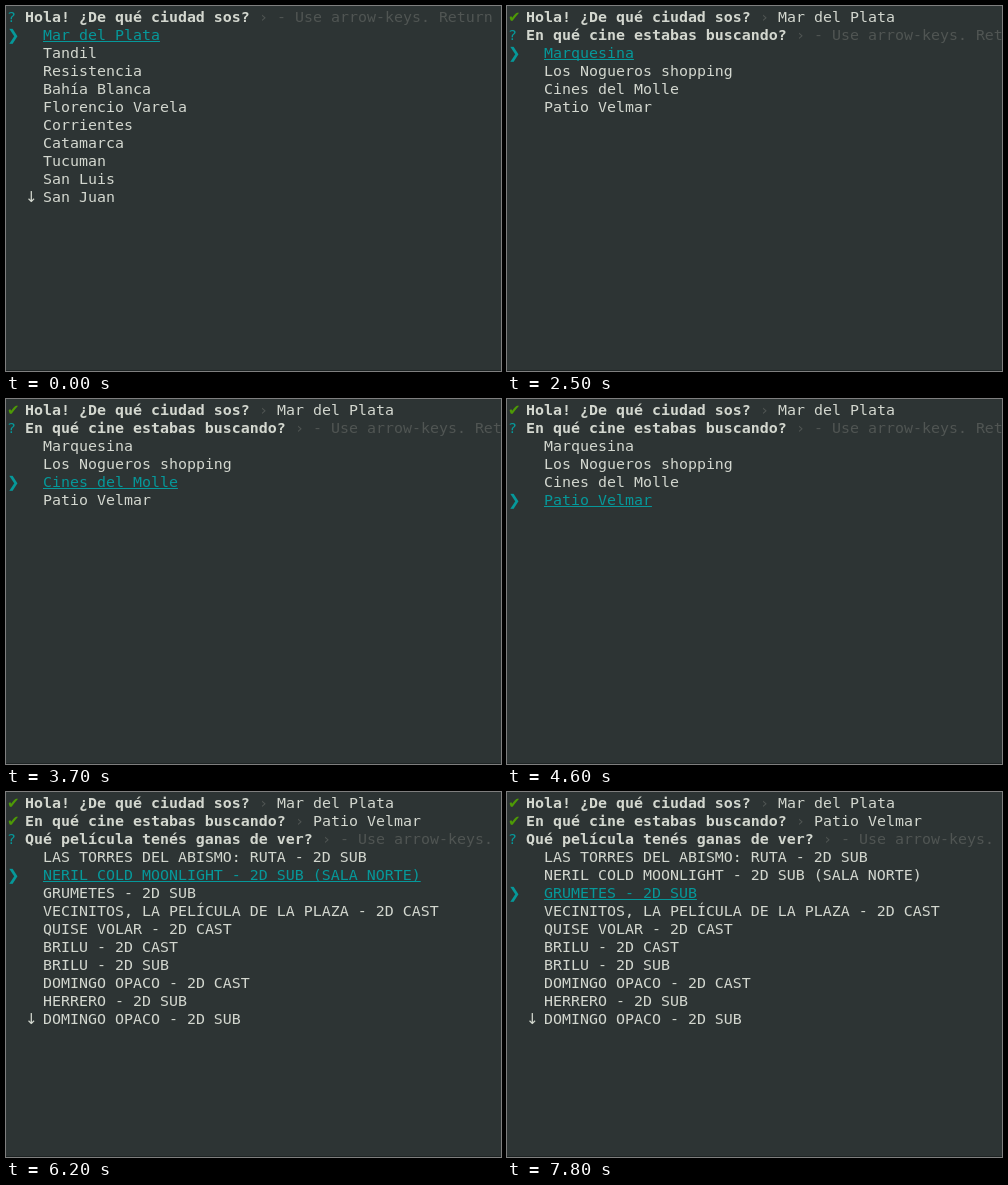
An HTML page that plays this animation: 495 by 365 pixels, repeating every 8 s.

```html
<!DOCTYPE html>
<html lang="es">
<head>
<meta charset="utf-8">
<style>
  html, body { margin: 0; width: 100%; height: 100%; overflow: hidden; background: #2d3434; }
  #term {
    position: relative; box-sizing: border-box; width: 495px; height: 365px;
    overflow: hidden; border-bottom: 1px solid #1d2323; color: #d3d7cf;
    /* size chosen so that one cell is 9px wide */
    font: 14.95px/18px "DejaVu Sans Mono", monospace;
  }
  #term span { position: absolute; white-space: pre; height: 18px; }
  #term .icon { font: 15px/18px "DejaVu Sans", sans-serif; }
  #term .ask { font-weight: bold; }
  .cyan { color: #06989a; }
  .green { color: #4e9a06; }
  .dim { color: #505553; }
  .picked {
    color: #06989a;
    text-decoration: underline 1px; text-underline-offset: 1px; text-decoration-skip-ink: none;
  }
</style>
</head>
<body>
<div id="term"></div>
<script>
const LOOP = 8000;
const term = document.getElementById('term');

const prompts = [
  { ask: 'Hola! ¿De qué ciudad sos?', answer: 'Mar del Plata', more: true, options: [
    'Mar del Plata', 'Tandil', 'Resistencia', 'Bahía Blanca', 'Florencio Varela',
    'Corrientes', 'Catamarca', 'Tucuman', 'San Luis', 'San Juan'] },
  { ask: 'En qué cine estabas buscando?', answer: 'Patio Velmar', options: [
    'Marquesina', 'Los Nogueros shopping', 'Cines del Molle', 'Patio Velmar'] },
  { ask: 'Qué película tenés ganas de ver?', more: true, options: [
    'LAS TORRES DEL ABISMO: RUTA - 2D SUB', 'NERIL COLD MOONLIGHT - 2D SUB (SALA NORTE)',
    'GRUMETES - 2D SUB', 'VECINITOS, LA PELÍCULA DE LA PLAZA - 2D CAST',
    'QUISE VOLAR - 2D CAST', 'BRILU - 2D CAST', 'BRILU - 2D SUB',
    'DOMINGO OPACO - 2D CAST', 'HERRERO - 2D SUB', 'DOMINGO OPACO - 2D SUB'] }
];

// start time, number of answered prompts, selected option (none while loading)
const steps = [
  [0, 0, 0], [1900, 1], [2500, 1, 0], [3400, 1, 1], [3700, 1, 2],
  [4600, 1, 3], [5200, 2, 0], [6200, 2, 1], [6800, 2, 2]
];

function put(row, col, text, cls = '') {
  const cell = document.createElement('span');
  cell.className = cls;
  cell.textContent = text;
  cell.style.left = 1 + col * 9 + 'px';
  cell.style.top = 2 + row * 18 + 'px';
  term.append(cell);
}

function question(row, { ask }, tail, tailClass) {
  put(row, 2, ask, 'ask');
  put(row, ask.length + 3, '›', 'dim');
  put(row, ask.length + 5, tail, tailClass);
}

function render([, done, picked]) {
  term.replaceChildren();
  prompts.slice(0, done).forEach((p, row) => {
    put(row, 0, '✔', 'icon green');
    question(row, p, p.answer);
  });
  if (picked === undefined) return;

  const current = prompts[done];
  put(done, 0, '?', 'cyan');
  question(done, current, '- Use arrow-keys. Return to submit.', 'dim');
  current.options.forEach((text, i) => put(done + 1 + i, 4, text, i === picked ? 'picked' : ''));
  put(done + 1 + picked, 0, '❯', 'icon cyan');
  if (current.more) put(done + current.options.length, 2, '↓', 'icon');
}

const start = performance.now();
let shown;
function tick() {
  const t = (performance.now() - start) % LOOP;
  const step = steps.findLast(([from]) => from <= t);
  if (step !== shown) render(shown = step);
  requestAnimationFrame(tick);
}
tick();
</script>
</body>
</html>
```
